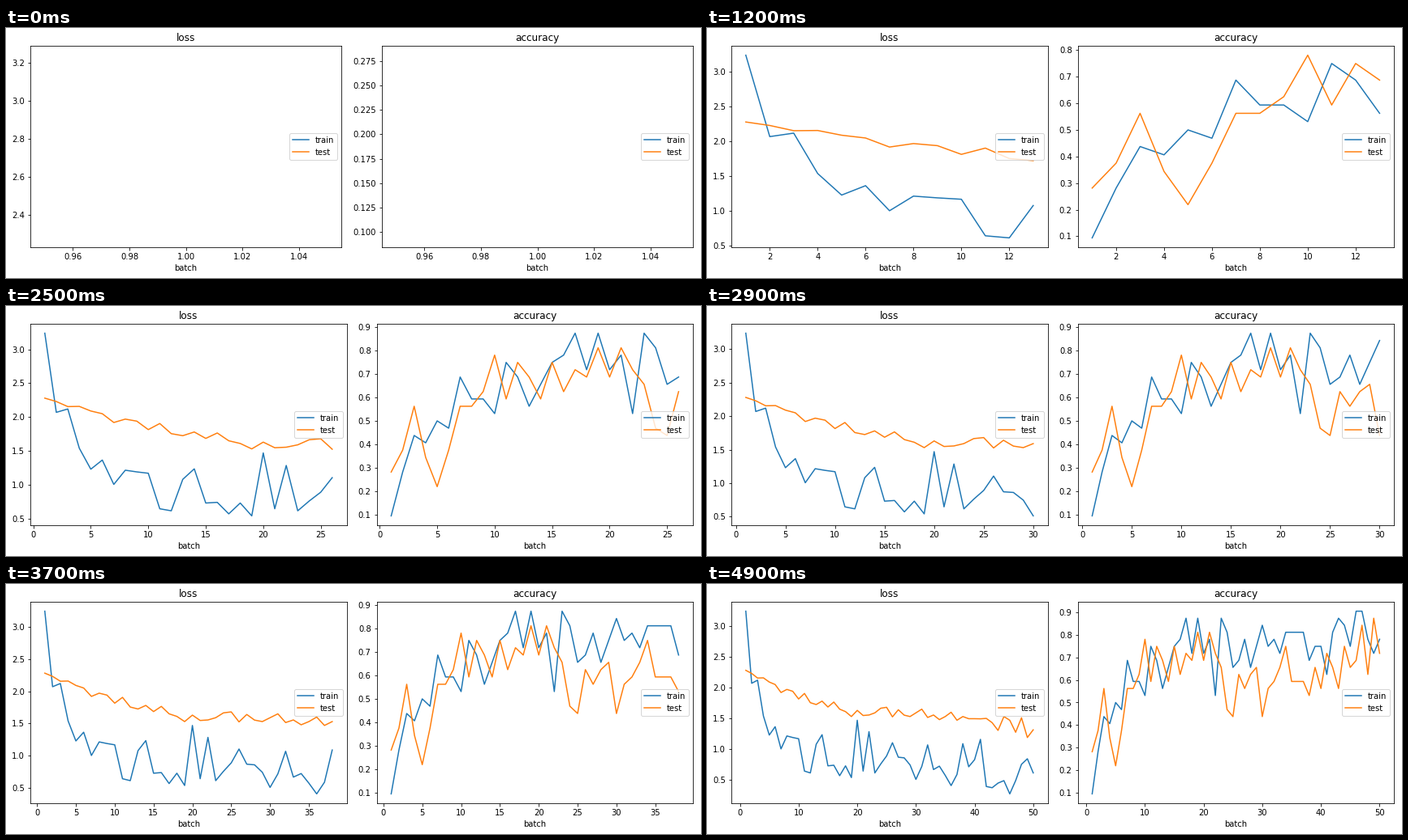
A matplotlib script for the animation above (5000 ms loop, 856 by 309 pixels).

```python
import matplotlib.pyplot as plt
import numpy as np
from matplotlib.animation import FuncAnimation

WIDTH, HEIGHT, DPI = 856, 309, 72
STEPS, INTERVAL = 50, 100

# Layout in pixels, y measured from the top
MARGIN, TOP, BOTTOM, RIGHT = 7.2, 22.3, 270.7, 849.6
TICK, TICK_PAD, GAP = 3.5, 3.5, 10.8
DIGIT, POINT = 6.36, 3.18

LOSS_TRAIN = [
    3.24, 2.07, 2.12, 1.54, 1.23, 1.365, 1.005, 1.215, 1.19, 1.17,
    .645, .615, 1.08, 1.235, .73, .74, .57, .73, .54, 1.47,
    .645, 1.285, .615, .76, .89, 1.105, .87, .86, .745, .51,
    .72, 1.07, .67, .725, .575, .41, .59, 1.09, .715, .83,
    1.16, .395, .375, .45, .49, .275, .49, .755, .845, .615]
LOSS_TEST = [
    2.28, 2.23, 2.155, 2.158, 2.09, 2.05, 1.92, 1.97, 1.94, 1.815,
    1.905, 1.755, 1.725, 1.78, 1.685, 1.765, 1.65, 1.61, 1.53, 1.63,
    1.547, 1.555, 1.59, 1.665, 1.68, 1.525, 1.64, 1.553, 1.53, 1.59,
    1.65, 1.515, 1.555, 1.48, 1.53, 1.6, 1.47, 1.53, 1.495, 1.495,
    1.493, 1.5, 1.43, 1.305, 1.53, 1.47, 1.275, 1.51, 1.19, 1.315]

# Correct answers in each batch of 32
HITS_TRAIN = [
    3, 9, 14, 13, 16, 15, 22, 19, 19, 17, 24, 22, 18, 21, 24, 25, 28,
    23, 28, 23, 25, 17, 28, 26, 21, 22, 25, 21, 24, 27, 24, 25, 23, 26,
    26, 26, 26, 22, 24, 24, 20, 26, 28, 27, 24, 29, 29, 25, 23, 25]
HITS_TEST = [
    9, 12, 18, 11, 7, 12, 18, 18, 20, 25, 19, 24, 22, 19, 24, 20, 23,
    22, 26, 22, 26, 23, 21, 15, 14, 20, 18, 20, 21, 14, 18, 19, 21, 24,
    19, 19, 19, 17, 21, 18, 23, 21, 18, 24, 21, 22, 27, 20, 28, 23]

CHARTS = [
    ("loss", np.array(LOSS_TRAIN), np.array(LOSS_TEST)),
    ("accuracy", np.array(HITS_TRAIN) / 32, np.array(HITS_TEST) / 32),
]

plt.rcParams["font.family"] = "DejaVu Sans"
fig = plt.figure(figsize=((WIDTH + 1e-6) / DPI, (HEIGHT + 1e-6) / DPI),
                 dpi=DPI, facecolor="white")
axes = [fig.add_axes([0.1 + 0.5 * i, 0.1, 0.35, 0.8]) for i in range(2)]


def place(ax, left, width):
    ax.set_position([left / WIDTH, 1 - BOTTOM / HEIGHT,
                     width / WIDTH, (BOTTOM - TOP) / HEIGHT])


def text_width(text):
    return sum(POINT if c == "." else DIGIT for c in text)


def tick_labels(axis):
    low, high = axis.get_view_interval()
    ticks = [t for t in axis.get_majorticklocs() if low <= t <= high]
    return ticks, axis.get_major_formatter().format_ticks(ticks)


def label_room(ax):
    labels = tick_labels(ax.yaxis)[1]
    return max(map(text_width, labels)) + TICK + TICK_PAD


def overhang(ax, width):
    """Space needed right of the axes for the last x tick label."""
    ticks, labels = tick_labels(ax.xaxis)
    low, high = ax.get_xlim()
    inside = (high - ticks[-1]) / (high - low) * width
    return max(TICK, text_width(labels[-1]) / 2 - inside)


def arrange():
    """Fit two equally wide charts around their tick labels."""
    left_room, right_room = map(label_room, axes)
    left = MARGIN + left_room
    extra = overhang(axes[0], 389)
    gap = extra + GAP + right_room
    width = (RIGHT - extra - left - gap) / 2
    place(axes[0], left, width)
    place(axes[1], left + width + gap, width)


def draw(frame):
    count = frame + 1
    batches = np.arange(1, count + 1)
    for ax, (title, train, test) in zip(axes, CHARTS):
        ax.clear()
        ax.plot(batches, train[:count], label="train")
        ax.plot(batches, test[:count], label="test")
        ax.set_title(title)
        ax.set_xlabel("batch")
        ax.legend(loc="center right")
    arrange()
    return []


anim = FuncAnimation(fig, draw, frames=STEPS, interval=INTERVAL,
                     init_func=lambda: [], repeat=True, blit=False)
plt.show()
```
